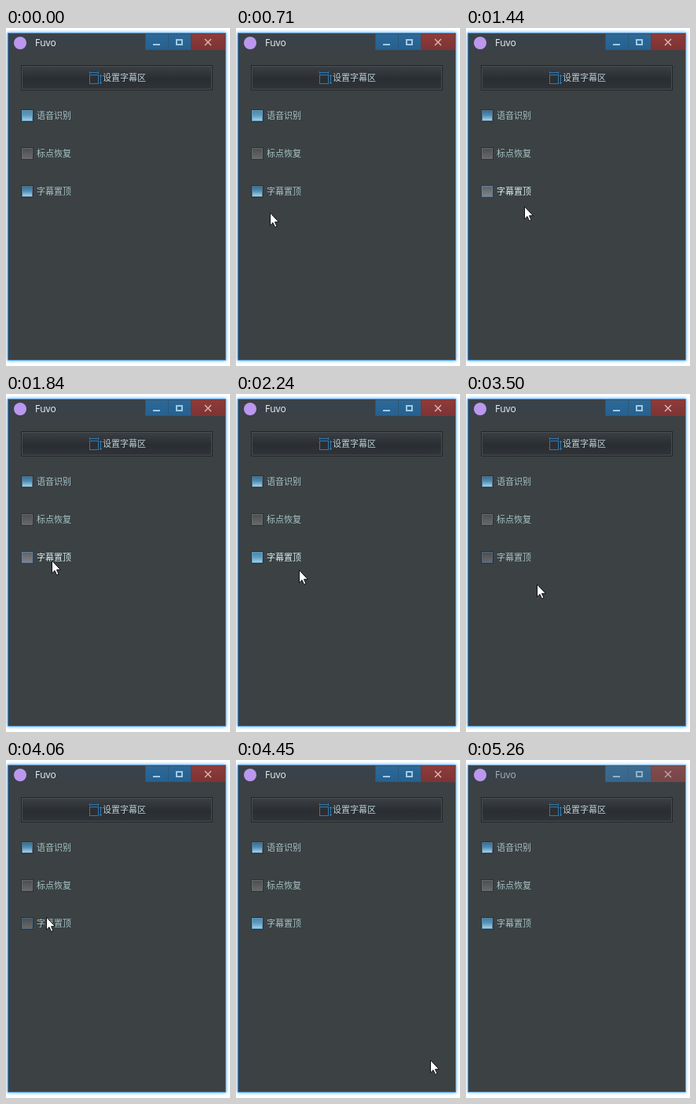
Write an HTML page that moves like this. It is 285 px wide and 428 px high and loops after 5320 ms.

```html
<!DOCTYPE html>
<html lang="zh-CN">
<head>
<meta charset="utf-8">
<title>Fuvo</title>
<style>
  html, body { margin: 0; width: 100%; height: 100%; overflow: hidden; background: #fff; }
  #stage {
    position: relative; width: 285px; height: 428px; overflow: hidden;
    font: 11px/16px "Noto Sans CJK SC", "Noto Sans CJK", sans-serif;
    --loop: 5320ms step-end infinite;
  }
  #stage * { box-sizing: border-box; }
  #stage div, #stage span, #stage svg { position: absolute; }

  #win {
    left: 2px; top: 6px; width: 278px; height: 415px;
    background: #3c4144; border: 1px solid #3390e4;
    box-shadow: 0 0 4px #4a98dc;
    animation: frame var(--loop);
  }
  #bar { left: 3px; top: 7px; width: 276px; height: 24px; background: linear-gradient(#38424b, #3b4146); }
  #logo { left: 10px; top: 11px; width: 16px; height: 16px; border-radius: 50%; background: #bb98ee; }
  #title {
    left: 37px; top: 11px; color: #f0f4f6;
    font: 12px/16px "Open Sans", "Noto Sans", sans-serif;
    animation: title var(--loop);
  }
  .ctl { top: 7px; height: 21px; background: linear-gradient(#2c6998, #266190); border: 1px solid #2b5878; }
  #min { left: 177px; width: 30px; }
  #max { left: 206px; width: 30px; }
  #close { left: 235px; width: 44px; background: linear-gradient(#8d3c3b, #7e3333); border-color: #6f3a3b; }
  #icons { left: 177px; top: 8px; fill: none; stroke: #9fc9e3; }
  #veil { left: 177px; top: 7px; width: 102px; height: 21px; background: #65757f; opacity: 0; animation: veil var(--loop); }

  #button {
    left: 19px; top: 47px; width: 244px; height: 32px;
    border: 1px solid #212528;
    background: linear-gradient(#3b4045, #2a2d31 55%, #303438);
    box-shadow: inset 0 0 0 1px #4a4f53;
  }
  #button svg { left: 85px; top: 7px; fill: none; stroke: #2f79b0; }
  #button span { left: 103px; top: 6px; color: #bad2d6; white-space: nowrap; }

  .row { left: 19px; width: 100px; height: 16px; }
  .row span { left: 20px; top: -1px; color: #a6c4c6; white-space: nowrap; }
  .box, .on, .focus {
    left: 0; top: 0; width: 16px; height: 16px;
    border: 1px solid #2d3134; box-shadow: inset 0 0 0 1px var(--rim);
  }
  .box { --rim: #66696b; background: linear-gradient(#4c4d4e, #696a6b); }
  .on { --rim: #567084; background: linear-gradient(#2f6b94, #4d8db4 45%, #b5dcf0); }
  .focus { --rim: #609bc0; background: linear-gradient(#4c87ad, #5d9abd 45%, #a9d5ec); }
  #row1 .focus { animation: focus1 var(--loop); }
  #row3 .box { animation: box3 var(--loop), glow var(--loop); }
  #row3 .on { animation: check var(--loop); }
  #row3 .focus { left: -1px; top: -1px; animation: focus3 var(--loop); }
  #row3 span { animation: hover var(--loop); }

  #cursor { left: 0; top: 0; width: 0; height: 0; animation: move var(--loop); }
  #cursor svg { left: -1px; top: -1px; }
  #press {
    left: -12px; top: -13px; width: 24px; height: 24px; border-radius: 50%;
    background: #bab51cdd; animation: press var(--loop);
  }

  @keyframes frame {
    0% { border-color: #3390e4; box-shadow: 0 0 4px #4a98dc; }
    97.18%, 100% { border-color: #5aa2dc; box-shadow: 0 0 4px #83bff2; }
  }
  @keyframes title {
    0% { color: #f0f4f6; }
    97.18% { color: #ccd4d8; }
    98.87%, 100% { color: #a9b4ba; }
  }
  @keyframes veil {
    0% { opacity: 0; }
    97.18% { opacity: .15; }
    98.87%, 100% { opacity: .28; }
  }
  @keyframes focus1 { 0% { opacity: 1; } 19.36%, 100% { opacity: 0; } }
  @keyframes focus3 { 0% { opacity: 0; } 19.36% { opacity: 1; } 97.18%, 100% { opacity: .6; } }
  @keyframes box3 { 0% { --rim: #66696b; } 19.36%, 100% { --rim: #50687e; } }
  @keyframes check {
    0%, 39.09%, 77.81%, 100% { opacity: 1; }
    22.36%, 58.45% { opacity: 0; }
  }
  @keyframes hover {
    0%, 30.07%, 44.92%, 61.46%, 73.3%, 100% { color: #a6c4c6; }
    16.35%, 33.07%, 36.09%, 49.43%, 68.79% { color: #d6f0f0; }
  }
  @keyframes glow {
    0%, 30.07%, 44.92%, 61.46%, 73.3%, 100% { filter: none; }
    16.35%, 33.07%, 36.09%, 49.43%, 68.79% { filter: brightness(1.25); }
  }
  @keyframes press {
    0%, 20.86%, 37.59%, 56.95%, 76.31%, 100% { opacity: 0; }
    19.36%, 36.09%, 53.75%, 73.3% { opacity: 1; }
  }
  /* Each leg advances in 80 ms ticks. */
  @keyframes move {
    0% { transform: translate(300px, 440px); }
    4.32% { transform: translate(243px, 371px); animation-timing-function: steps(3); }
    8.83% { transform: translate(90px, 262px); animation-timing-function: steps(3); }
    13.34% { transform: translate(43px, 234px); animation-timing-function: steps(4); }
    19.36% { transform: translate(51px, 206px); }
    20.86% { transform: translate(51px, 206px); animation-timing-function: steps(2); }
    23.87% { transform: translate(62px, 214px); animation-timing-function: steps(2); }
    27.06% { transform: translate(74px, 226px); animation-timing-function: steps(2); }
    30.07% { transform: translate(84px, 231px); animation-timing-function: steps(3); }
    34.58% { transform: translate(58px, 211px); }
    36.09% { transform: translate(51px, 206px); }
    39.09% { transform: translate(57px, 209px); animation-timing-function: steps(2); }
    42.1% { transform: translate(80px, 223px); animation-timing-function: steps(2); }
    44.92% { transform: translate(93px, 235px); }
    47.93% { transform: translate(87px, 231px); animation-timing-function: steps(3); }
    52.44% { transform: translate(53px, 206px); }
    53.75% { transform: translate(52px, 205px); }
    56.95% { transform: translate(54px, 207px); animation-timing-function: steps(4); }
    62.78% { transform: translate(95px, 247px); }
    65.78% { transform: translate(90px, 241px); animation-timing-function: steps(5); }
    73.3% { transform: translate(51px, 200px); }
    76.31% { transform: translate(51px, 199px); }
    77.81% { transform: translate(75px, 222px); animation-timing-function: steps(4); }
    83.64% { transform: translate(247px, 380px); }
    88.15% { transform: translate(252px, 394px); animation-timing-function: steps(3); }
    92.85%, 100% { transform: translate(264px, 432px); }
  }
</style>
</head>
<body>
<div id="stage">
  <div id="win"></div>
  <div id="bar"></div>
  <div id="logo"></div>
  <span id="title">Fuvo</span>
  <div id="min" class="ctl"></div>
  <div id="max" class="ctl"></div>
  <div id="close" class="ctl"></div>
  <svg id="icons" width="102" height="20">
    <path d="M10 13H19" stroke-width="2"/>
    <rect x="40" y="7" width="7" height="6" stroke-width="2"/>
    <path d="M76 6L84 14M84 6L76 14" stroke="#e0bcbc" stroke-width="1.3"/>
  </svg>
  <div id="veil"></div>

  <div id="button">
    <svg width="18" height="18">
      <rect x="1.5" y="4.5" width="11" height="11"/>
      <path d="M1 1.5H13M1.5 0V3M12.5 0V3M15.5 4V16M14 5.5H17M14 14.5H17"/>
    </svg>
    <span>设置字幕区</span>
  </div>

  <div id="row1" class="row" style="top:103px"><div class="on"></div><div class="focus"></div><span>语音识别</span></div>
  <div class="row" style="top:151px"><div class="box"></div><span>标点恢复</span></div>
  <div id="row3" class="row" style="top:199px">
    <div class="box"></div>
    <div class="on"><div class="focus"></div></div>
    <span>字幕置顶</span>
  </div>

  <div id="cursor">
    <div id="press"></div>
    <svg width="14" height="21">
      <path d="M1.5 1V17L5 13.6L7.6 19.3L10 18.2L7.5 12.7H12.4Z" fill="#fff" stroke="#111"/>
    </svg>
  </div>
</div>
</body>
</html>
```
